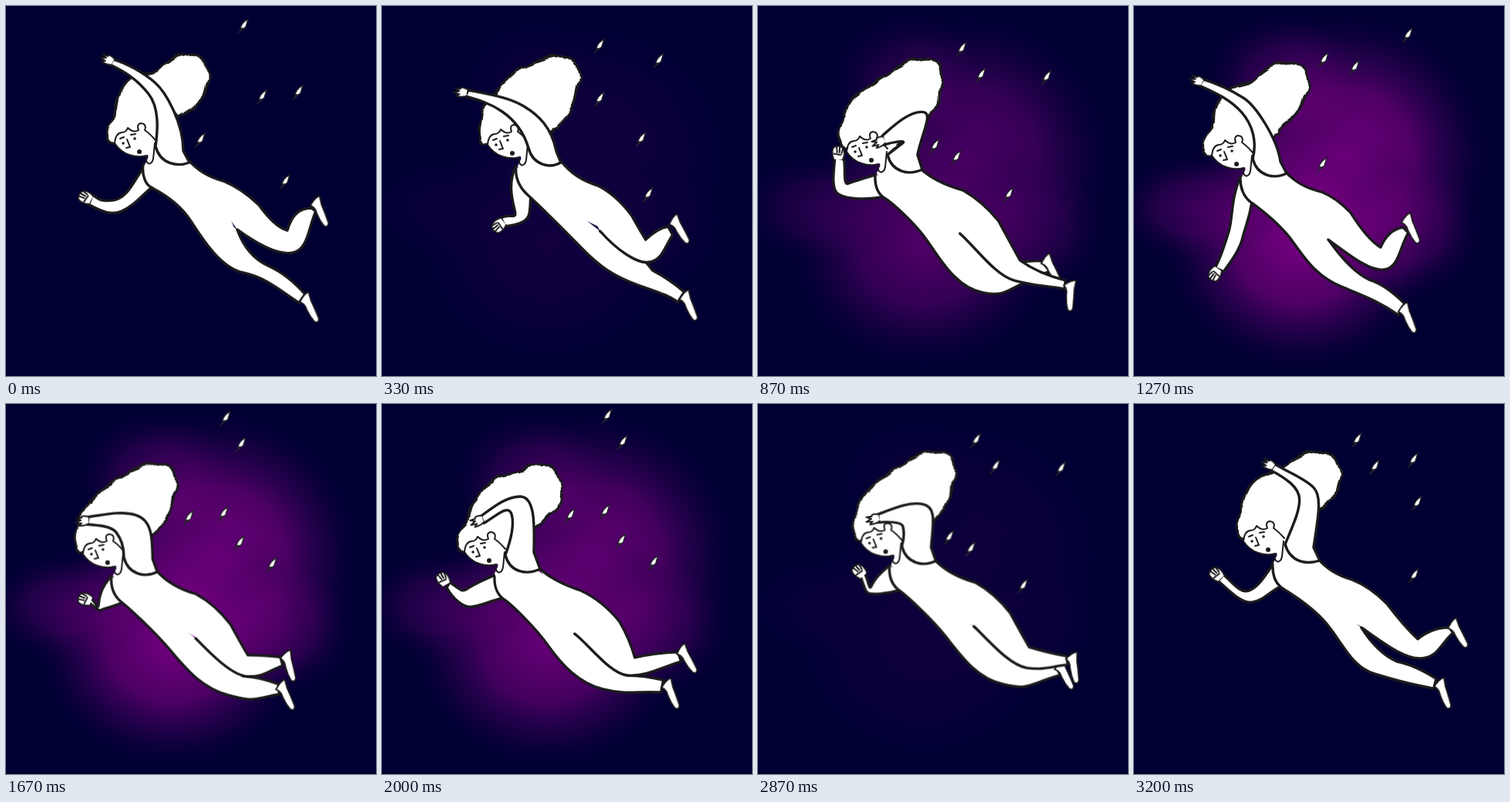
An HTML page without scripts for the animation above (3.27 s loop, 480 px wide and 480 px high).

```html
<!DOCTYPE html>
<html lang="en">
<head>
<meta charset="utf-8">
<title>Floating figure</title>
<style>
html,body{margin:0;width:100%;height:100%;overflow:hidden;background:#000033}
svg{display:block;width:100vw;height:100vh}
.ink{fill:#fff;stroke:#1b1a1d;stroke-width:3.4;stroke-linejoin:round;stroke-linecap:round}
.fine{stroke-width:2}
.line{fill:none}
.plain{fill:#fff}

#glow{animation:glow 3.27s linear infinite}
#drift{animation:drift 3.27s linear infinite}
.move{animation:1.09s linear infinite}
.sparks{opacity:0;animation:1.09s step-end infinite}

@keyframes glow{
0%,97%,100%{opacity:0}
10.1%{opacity:.16}
26.6%{opacity:.68}
38.8%{opacity:1}
50%{opacity:1}
61.2%{opacity:.88}
77.4%{opacity:.3}
}
@keyframes drift{
0%,100%{transform:translate(0,0)}
10.1%{transform:translate(-4px,2px)}
26.6%{transform:translate(-26px,11px)}
38.8%{transform:translate(-40px,16px)}
50%{transform:translate(-42px,17px)}
61.2%{transform:translate(-34px,14px)}
77.4%{transform:translate(-16px,5px)}
97.9%{transform:translate(1px,0)}
}

#hair{animation-name:hair}
@keyframes hair{
0%,100%{d:path("M141 178C127 172 129 158 138 150S139 120 155 100S188 92 199 80S228 62 240 61S267 82 262 100S251 132 233 138S226 146 218 138L194 182Z")}
16.5%{d:path("M137 178C122 166 130 156 140 146S137 122 155 100S184 90 196 78S226 55 244 56S273 80 264 98S255 124 239 134S232 152 224 152L194 182Z")}
30.3%,32.1%{d:path("M135 176C126 164 132 152 133 140S140 128 152 110S172 83 188 76S220 63 236 62S265 82 259 100S255 130 241 144S238 156 226 160L194 182Z")}
79.8%{d:path("M140 172C128 164 127 150 135 140S138 116 154 104S187 79 205 69S232 55 248 56S267 80 263 92S265 112 255 124S240 140 232 150L194 182Z")}
83.5%{d:path("M141 178C126 168 131 154 141 146S142 128 154 111S178 77 198 76S226 61 242 63S267 82 267 100S263 124 251 130S244 142 232 144L194 182Z")}
93.6%{d:path("M141 174C128 166 133 152 137 142S141 116 152 103S183 87 197 77S226 61 240 61S271 80 267 96S261 120 253 126S244 138 232 138L196 182Z")}
}

#farArm{animation-name:farArm}
@keyframes farArm{
0%,100%{d:path("M179 209C166 226 158 250 138 252S120 248 112 245L107 257C124 266 136 272 150 266S172 250 189 235")}
16.5%{d:path("M178 206C166 232 168 260 163 276S153 310 145 324L156 329C167 314 177 300 181 284S189 262 193 238")}
30.3%,32.1%{d:path("M177 206C168 228 172 246 176 262S170 265 158 273L164 284C184 281 193 277 195 267S196 250 197 243")}
79.8%{d:path("M178 208C160 214 150 216 143 219S140 200 138 187L126 184C124 204 121 222 127 230S160 242 191 236")}
83.5%{d:path("M180 208C166 214 156 218 147 224S140 230 122 217L118 224C126 238 138 250 150 249S172 242 193 237")}
93.6%{d:path("M180 207C168 224 160 238 148 242S126 230 115 221L108 229C122 241 138 259 152 257S173 245 190 236")}
}
#farHand{animation-name:farHand}
@keyframes farHand{
0%,100%{transform:translate(104px,248px) rotate(-60deg)}
16.5%{transform:translate(145px,331px) rotate(-145deg)}
30.3%,32.1%{transform:translate(156px,282px) rotate(-130deg)}
79.8%{transform:translate(131px,180px) rotate(5deg)}
83.5%{transform:translate(114px,214px) rotate(-30deg)}
93.6%{transform:translate(107px,221px) rotate(-45deg)}
}

#lowLeg{animation-name:lowLeg}
@keyframes lowLeg{
0%,100%{d:path("M178 205C176 220 181 231 188 235S222 251 240 279S280 340 308 346S352 366 380 385L388 374Q365 348 340 337Q312 324 300 290")}
16.5%{d:path("M178 205C177 220 183 232 191 238S228 264 247 291S280 336 309 348S358 367 383 385L391 370Q366 345 345 339Q320 327 293 288")}
30.3%,32.1%{d:path("M178 206C176 222 184 235 193 243S238 286 262 311S305 349 339 361S376 374 388 382L396 369Q378 353 355 341Q334 312 287 290")}
79.8%{d:path("M178 207C177 224 182 233 190 238S228 268 246 294S284 355 318 361S345 356 405 332L393 319Q360 318 340 330Q326 312 288 284")}
83.5%{d:path("M180 207C179 225 184 234 193 240S233 276 250 300S289 348 321 356S364 358 396 360L399 344Q374 338 352 338Q328 314 284 284")}
93.6%{d:path("M179 205C178 220 182 231 189 237S226 258 248 284S281 341 311 350S352 362 388 369L391 356Q362 338 340 334Q314 322 294 290")}
}
#lowFoot{animation-name:lowFoot}
@keyframes lowFoot{
0%,100%{transform:translate(387px,378px) rotate(-26deg)}
16.5%{transform:translate(389px,375px) rotate(-23deg)}
30.3%,32.1%{transform:translate(396px,373px) rotate(-23deg)}
79.8%{transform:translate(399px,316px) rotate(-28deg)}
83.5%{transform:translate(403px,348px) rotate(-22deg)}
93.6%{transform:translate(395px,361px) rotate(-19deg)}
}

#topLeg{animation-name:topLeg}
@keyframes topLeg{
0%,100%{d:path("M300 290C322 306 352 324 372 320S392 288 402 266L396 262Q373 262 365 291Q349 287 328 258Q306 237 282 227Q254 220 237 200")}
16.5%{d:path("M292 287C316 304 344 328 364 326S384 298 396 278L389 271Q370 274 360 297Q343 287 321 252Q303 233 283 225Q253 218 237 199")}
30.3%,32.1%{d:path("M287 290C308 314 336 334 352 330S370 312 381 295L375 284Q362 286 346 301Q339 290 328 270Q308 243 284 231Q254 222 237 200")}
79.8%{d:path("M288 284C310 304 334 338 358 345S396 352 424 357L425 346Q390 337 366 319Q353 296 338 268Q318 243 292 228Q256 218 237 200")}
83.5%{d:path("M284 284C304 300 330 336 352 338S392 330 422 320L418 308Q388 309 362 315Q355 290 342 268Q320 241 292 228Q256 216 238 199")}
93.6%{d:path("M294 290C320 308 350 332 372 330S396 312 413 297L408 290Q386 290 367 305Q349 288 327 259Q305 237 282 228Q254 220 238 201")}
}
#topFoot{animation-name:topFoot}
@keyframes topFoot{
0%,100%{transform:translate(401px,253px) rotate(-23deg)}
16.5%{transform:translate(393px,259px) rotate(-24deg)}
30.3%,32.1%{transform:translate(382px,275px) rotate(-30deg)}
79.8%{transform:translate(431px,350px) rotate(3deg)}
83.5%{transform:translate(422px,304px) rotate(-30deg)}
93.6%{transform:translate(412px,285px) rotate(-29deg)}
}

#nearArm{animation-name:nearArm}
@keyframes nearArm{
0%,100%{d:path("M194 182C197 160 199 132 185 114S156 86 135 76L139 69C156 74 178 86 193 99S230 152 230 188L238 203C222 209 200 205 194 182Z")}
16.5%{d:path("M194 182C200 160 194 138 180 122S146 96 125 87L130 79C146 84 166 93 182 103S226 156 230 186L238 201C222 209 200 205 194 182Z")}
30.3%,32.1%{d:path("M194 182C188 162 176 146 160 135S130 120 112 115L116 107C140 112 168 116 188 128S224 156 230 186L236 201C222 209 200 205 194 182Z")}
79.8%{d:path("M194 182C202 176 208 172 214 168S202 166 190 170L188 158C202 146 220 128 238 127S240 150 233 182L239 201C222 209 200 205 194 182Z")}
83.5%{d:path("M194 182C202 160 206 142 202 129S184 130 166 141L162 132C176 122 194 106 213 106S232 140 231 178L239 200C222 208 200 205 194 182Z")}
93.6%{d:path("M195 182C204 160 214 140 214 124S196 96 177 86L182 78C198 88 220 96 232 108S238 146 232 186L240 203C222 209 202 205 195 182Z")}
}
#nearHand{animation-name:nearHand}
@keyframes nearHand{
0%,100%{transform:translate(133px,70px) rotate(-62deg)}
16.5%{transform:translate(123px,81px) rotate(-65deg)}
30.3%,32.1%{transform:translate(108px,110px) rotate(-80deg)}
79.8%{transform:translate(185px,166px) rotate(-110deg)}
83.5%{transform:translate(159px,138px) rotate(-110deg)}
93.6%{transform:translate(175px,79px) rotate(-58deg)}
}

#sA{animation-name:sA}
#sB{animation-name:sB}
#sC{animation-name:sC}
#sD{animation-name:sD}
#sE{animation-name:sE}
#sF{animation-name:sF}
@keyframes sA{0%,97%{opacity:1}8%,100%{opacity:0}}
@keyframes sB{0%,23%,100%{opacity:0}8%{opacity:1}}
@keyframes sC{0%,42%,100%{opacity:0}23%{opacity:1}}
@keyframes sD{0%,60%,88%,100%{opacity:0}42%,81.5%{opacity:1}}
@keyframes sE{0%,81.5%,100%{opacity:0}60%{opacity:1}}
@keyframes sF{0%,97%,100%{opacity:0}88%{opacity:1}}
</style>
</head>
<body>
<svg viewBox="0 0 480 480">
<defs>
<radialGradient id="haze">
<stop offset="0" stop-color="#7e0086" stop-opacity=".9"/>
<stop offset=".45" stop-color="#76007f" stop-opacity=".66"/>
<stop offset=".75" stop-color="#520069" stop-opacity=".26"/>
<stop offset="1" stop-color="#000033" stop-opacity="0"/>
</radialGradient>
<filter id="wavy" x="-10%" y="-10%" width="120%" height="120%">
<feTurbulence type="fractalNoise" baseFrequency=".06" numOctaves="1" seed="4"/>
<feDisplacementMap in="SourceGraphic" scale="10" xChannelSelector="R" yChannelSelector="G"/>
</filter>
<path id="foot" d="M-8 3Q-5 5 -4 11Q-5 24 -2 34Q2 39 5 33Q6 18 6 8L8 -4Q2 -5 -8 3Z"/>
<path id="spark" d="M6 -9Q-2 -5 -4 3L-1 3L-7 9L3 1Z" fill="#fff" stroke="#25232a" stroke-width="1.4"/>
</defs>

<rect width="480" height="480" fill="#000033"/>
<g id="glow" fill="url(#haze)">
<ellipse cx="275" cy="195" rx="195" ry="195"/>
<ellipse cx="215" cy="310" rx="185" ry="170"/>
<ellipse cx="80" cy="262" rx="110" ry="75" opacity=".45"/>
<ellipse cx="355" cy="290" rx="105" ry="95" opacity=".45"/>
<ellipse cx="195" cy="95" rx="110" ry="95" opacity=".4"/>
</g>

<g id="drift">
<g id="sA" class="sparks">
<use href="#spark" x="308" y="26"/><use href="#spark" x="332" y="118"/><use href="#spark" x="379" y="112"/><use href="#spark" x="252" y="174"/><use href="#spark" x="362" y="228"/>
</g>
<g id="sB" class="sparks">
<use href="#spark" x="286" y="54"/><use href="#spark" x="326" y="64"/><use href="#spark" x="395" y="22"/><use href="#spark" x="284" y="190"/>
</g>
<g id="sC" class="sparks">
<use href="#spark" x="286" y="50"/><use href="#spark" x="363" y="69"/><use href="#spark" x="286" y="119"/><use href="#spark" x="340" y="171"/><use href="#spark" x="349" y="243"/>
</g>
<g id="sD" class="sparks">
<use href="#spark" x="326" y="2"/><use href="#spark" x="346" y="36"/><use href="#spark" x="278" y="131"/><use href="#spark" x="323" y="126"/><use href="#spark" x="344" y="164"/><use href="#spark" x="386" y="192"/>
</g>
<g id="sE" class="sparks">
<use href="#spark" x="290" y="45"/><use href="#spark" x="315" y="79"/><use href="#spark" x="400" y="82"/><use href="#spark" x="255" y="171"/><use href="#spark" x="283" y="186"/><use href="#spark" x="351" y="234"/>
</g>
<g id="sF" class="sparks">
<use href="#spark" x="288" y="47"/><use href="#spark" x="311" y="82"/><use href="#spark" x="361" y="73"/><use href="#spark" x="366" y="129"/><use href="#spark" x="362" y="223"/>
</g>

<g class="ink">
<g filter="url(#wavy)"><path id="hair" class="move"/></g>
<path id="farArm" class="move"/>
<g id="farHand" class="move fine">
<path d="M-6 7Q-10 -2 -7 -8Q-2 -12 4 -9Q10 -4 6 7"/>
<path class="line" d="M-3 -9L-2 -2M1 -9L1 -2M5 -7L4 -1M-6 0L3 1"/>
</g>
<path id="lowLeg" class="move"/>
<g id="lowFoot" class="move fine"><use href="#foot"/></g>
</g>
<path class="plain" d="M238 203L193 178L180 206L192 232L232 259L297 290L276 240Z"/>
<g class="ink">
<path id="topLeg" class="move"/>
<g id="topFoot" class="move fine"><use href="#foot"/></g>
</g>

<path class="plain" d="M141 177Q147 189 160 193Q174 198 184 193L186 203L196 184L180 156L150 160Z"/>
<g class="ink fine">
<path class="line" d="M141 178Q148 189 160 193Q172 197 182 194C180 206 189 208 191 198L193 178"/>
<path class="line" d="M141 178Q142 165 150 164Q156 164 158 158Q165 165 172 161Q169 153 175 152Q183 153 180 161Q186 165 194 174"/>
<path class="line" d="M148 172L153 170M162 167L168 166M157 173L161 183L156 184"/>
</g>
<g fill="#1b1a1d"><circle cx="152" cy="178" r="1.8"/><circle cx="167" cy="172" r="1.8"/><circle cx="173" cy="189" r="3"/></g>

<g class="ink">
<path id="nearArm" class="move"/>
<g id="nearHand" class="move fine">
<path d="M-4 6Q-7 0 -6 -7L-3 -3L-2 -11L1 -4L4 -10L4 -3Q8 -3 5 6"/>
</g>
</g>
</g>
</svg>
</body>
</html>
```
